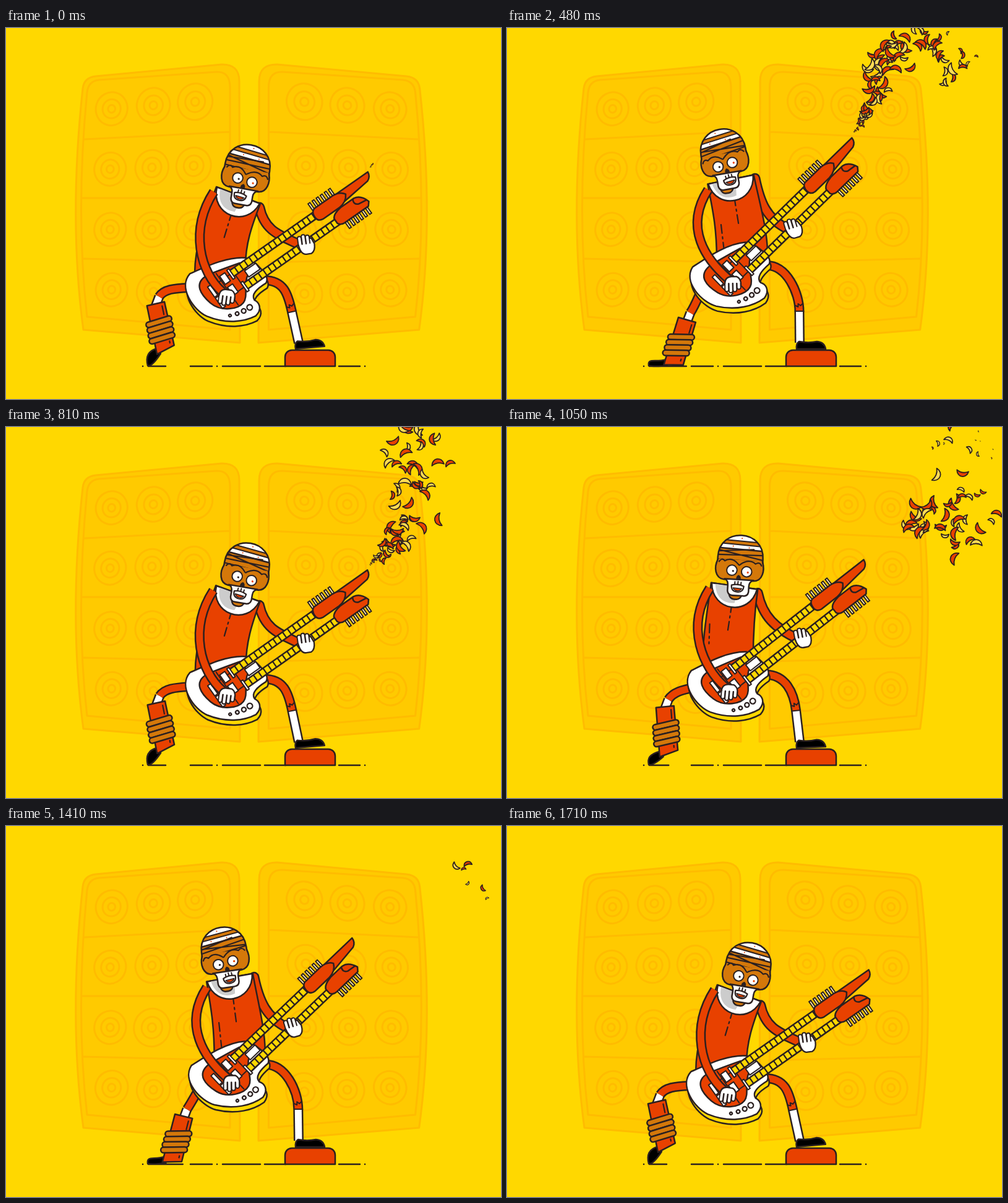
An HTML page with a canvas for the animation above (1.74 s loop, 800 px wide and 600 px high).

```html
<!DOCTYPE html>
<html lang="en">
<head>
<meta charset="utf-8">
<title>Guitarist</title>
<style>
html, body { margin: 0; width: 100%; height: 100%; overflow: hidden; background: #ffd800; }
canvas { display: block; }
</style>
</head>
<body>
<canvas id="stage" width="800" height="600"></canvas>
<script>
const ctx = document.getElementById('stage').getContext('2d');
const LOOP = 1740, BEAT = 870, PEAK = 450, STEP = 30;
const INK = '#2b2020', RED = '#e84100', ORANGE = '#d4780a', YELLOW = '#ffd800', WHITE = '#fff';
const CAB = '#ffca00', CAB_LINE = '#ffbc00';
const rad = d => d * Math.PI / 180;
const mix = (a, b, p) => a + (b - a) * p;
const add = ([x, y], dx, dy) => [x + dx, y + dy];

function noise(i, salt) {
  const v = Math.sin(i * 127.1 + salt * 311.7) * 43758.5453;
  return v - Math.floor(v);
}

// Rise of the body: 0 is the crouch, 1 the upright pose.
function rise(t) {
  t = (t % BEAT + BEAT) % BEAT;
  const x = t < PEAK ? t / PEAK : (BEAT - t) / (BEAT - PEAK);
  return x ** 3 * (x * (x * 6 - 15) + 10);
}

// Joints as [x, y, angle]: crouched, upright, and the bow of the path between.
const JOINTS = {
  guitar: [[377, 405, -35], [380, 381, -44.3]],
  chest: [[375.5, 270.5, 21], [361.5, 245, -11.5], [-4, -6, -3]],
  head: [[386, 246, 10], [352.5, 221, -10], [0, -6, 0]],
  boot: [[257, 521, -11], [268, 545, 18], [0, 0, -2]],
  hip: [[296, 420, 0], [314, 425, 0]],
  ankle: [[462, 459, -12], [472.5, 458, 0], [2, 0, 2]]
};

// World position of a point given in a joint's own frame.
function place([x, y, angle], u, v) {
  const c = Math.cos(rad(angle)), s = Math.sin(rad(angle));
  return [x + u * c - v * s, y + u * s + v * c];
}

function poseAt(t) {
  const p = rise(t), pose = { p };
  for (const [name, [low, up, bow = [0, 0, 0]]] of Object.entries(JOINTS))
    pose[name] = low.map((v, i) => mix(v, up[i], p) + bow[i] * 4 * p * (1 - p));
  pose.strum = place(pose.guitar, -33, 12.5);
  pose.fret = place(pose.guitar, mix(121, 100, p), 16);
  return pose;
}

function paint(path, fill, width = 2.5, line = INK) {
  if (fill) { ctx.fillStyle = fill; ctx.fill(path); }
  if (width) { ctx.lineWidth = width; ctx.strokeStyle = line; ctx.stroke(path); }
}
const svg = (d, fill, width, line) => paint(new Path2D(d), fill, width, line);
const seg = (x, y, x2, y2, width, line) => svg(`M${x},${y}L${x2},${y2}`, null, width, line);

function oval(x, y, rx, ry, fill, width, line, tilt = 0) {
  const path = new Path2D();
  path.ellipse(x, y, rx, ry, tilt, 0, 7);
  paint(path, fill, width, line);
}

function box(x, y, w, h, r, fill, width) {
  const path = new Path2D();
  path.roundRect(x, y, w, h, r);
  paint(path, fill, width);
}

// Outlined tube: a line through two points or a cubic through four.
function limb(pts, width, color, cap = 'butt') {
  const path = new Path2D(`M${pts[0]}${pts[3] ? 'C' : 'L'}${pts.slice(1)}`);
  ctx.lineCap = cap;
  paint(path, null, width + 5);
  paint(path, null, width, color);
  ctx.lineCap = 'round';
}

function local([x, y, angle = 0], draw) {
  ctx.save();
  ctx.translate(x, y);
  ctx.rotate(rad(angle));
  draw();
  ctx.restore();
}

function dashes(x, y, x2, y2) {
  ctx.setLineDash([14, 6, 3, 6]);
  seg(x, y, x2, y2, 2.2);
  ctx.setLineDash([]);
}

function cabinet(t, side) {
  svg('M125,488Q101,310 124,98Q126,80 145,78L348,59Q377,58 377,86L378,509Z', CAB, 3, CAB_LINE);
  svg('M131,467Q112,300 131,104Q133,86 150,84L340,71Q362,70 362,96V488Z' +
    'M127,180L361,168M122,275H362M125,373L363,379', null, 3, CAB_LINE);
  for (let i = 0; i < 12; i++) {
    const col = i % 3, row = Math.floor(i / 3);
    const x = 168 + 67.5 * col + 1.2 * (row - 1.5) ** 2;
    const y = 125 + 100.5 * row + 3 * (row - 1.9) * (col - 1);
    const beat = 150 + 1400 * noise(i, side);
    const r = (25.5 + 1.2 * col) * (1 + 0.12 * Math.max(0, 1 - Math.abs(t - beat) / 90));
    for (const f of [1, 0.57, 0.23]) oval(x, y, r * f, r * f * 1.06, null, 3, CAB_LINE, 0.3);
  }
}

function speakers(t) {
  cabinet(t, 1);
  ctx.save();
  ctx.transform(-1.026, 0, 0, 1, 795.9, 0);
  cabinet(t, 2);
  ctx.restore();
}

function ground({ p }) {
  svg(`M221,547h.1M230,547H${mix(258, 290, p * p)}M298,547H333M341,547h.1` +
    'M350,547H411M418,547H452M538,547H572M580,547h.1');
  box(451, 521, 81, 26, [11, 11, 0, 0], RED);
}

function rightLeg({ p, guitar, ankle }) {
  limb([ankle.slice(0, 2), [473, 509]], 11, WHITE);
  const hip = add(guitar, 40, 3);
  limb([hip, add(hip, 32, 0), place(ankle, 0, -30), ankle.slice(0, 2)], 11, RED);
  local(ankle, () => svg('M-7,0H7M-6,-9L-2,-7L-2,-12L2,-9L5,-12', null, 2));
  local([467, 519, -5 * (1 - p) ** 2], () =>
    svg('M1,0Q0,-9 5,-12Q20,-9 34,-12Q46,-11 48,0Z', '#000'));
}

function leftLeg({ p, hip, boot }) {
  const top = place(boot, 0, -76), cuff = add(top, 5, -12);
  limb([cuff, add(top, -1, 4)], 11, WHITE);
  limb([hip.slice(0, 2), add(hip, mix(-24, -4, p), mix(1, 8, p)), add(cuff, 8, -12), cuff], 11, RED);
  const heel = place(boot, -13, -5), sole = place(boot, -8, 4);
  svg(`M${heel}C${add(heel, -18, 5)} 227,${mix(538, 533, p)} 229,546Q236,548 ${sole}Z`, '#000');
  local(boot, () => {
    svg('M-15,-76L14,-77L16,-5L-14,4Z', RED);
    dashes(9, -71, 10, -10);
    for (let i = 0; i < 4; i++)
      local([-1, -47 + i * 9, mix(-6, -17, p)], () => limb([[-17, 0], [17, 0]], 6.5, ORANGE, 'round'));
  });
}

function torso({ p, guitar, chest, fret }) {
  const left = place(chest, -38, 0), right = place(chest, 38, 0);
  // fretting arm sits behind the body
  const shoulder = place(chest, 39, 6);
  limb([shoulder, add(shoulder, 8, 38), add(fret, -44, -14), add(fret, -8, 3)], 12, RED, 'round');
  const waist = add(guitar, mix(-31, 0, p), -14);
  const hemL = add(waist, -41, 6), hemR = add(waist, 41, -6);
  svg(`M${left}L${right}C${place(chest, 38, 40)} ${add(hemR, 0, -35)} ${hemR}` +
    `L${hemL}C${add(hemL, 0, -45)} ${place(chest, -38, 50)} ${left}Z`, RED);
  const mid = place(chest, 0, 29), flank = add(hemL, mix(14, 7, p), mix(-78, -55, p));
  dashes(...mid, ...add(mid, mix(-13, 7, p), 43));
  dashes(...flank, ...add(flank, mix(-4, 5, p), mix(27, 42, p)));
  local(chest, () => {
    svg('M-37,0C-31,46 31,46 37,0Z', WHITE);
    svg('M-31,1C-27,24 -12,31 4,27L6,14L-6,1Z', '#ccc', 0);
  });
}

function head({ p, head }) {
  const lean = mix(7, -7, p);
  local(head, () => {
    box(-14, 34, 20, 12, [0, 0, 8, 8], ORANGE);
    const dome = new Path2D('M-36,-8V-21C-36,-70 37,-70 37,-21V-8Z');
    ctx.save();
    ctx.clip(dome);
    paint(dome, ORANGE, 0);
    ctx.rotate(rad(lean));
    svg('M-50,-75H50V-36L-50,-34Z', WHITE);
    svg('M-50,-48L50,-49V-43L-50,-42Z', ORANGE, 2);
    svg('M-50,-33L50,-19M-50,-22L50,-30M-50,-27L20,-37M-50,-15L50,-19', null, 2.2);
    for (let i = 0; i < 4; i++) oval(i * 13 - 14, i % 2 ? -53 : -39, 1, 1, RED, 0);
    ctx.restore();
    paint(dome);
    svg('M-34,-18C-41,-4 -39,14 -24,15H24C39,14 41,-4 35,-18', ORANGE, 0);
    svg('M-36,-16C-41,-4 -39,14 -24,15H24C39,14 41,-4 37,-16');
    svg('M-23,14Q-17,16 -17,24V33Q-16,40 -9,40H9Q16,40 17,33V24Q17,16 24,14Z', WHITE);
    ctx.rotate(rad(lean));
    svg('M-34,-12Q-30,-19 -25,-14Q-14,-22 -3,-11Q-1,-8 1,-11Q14,-22 25,-14Q31,-19 35,-12', null, 2.2);
    for (const x of [-12, 12]) {
      oval(x, 0, 8.3, 8.3, WHITE, 2);
      oval(x + 2, 1, 1.6, 1.6, x < 0 ? INK : RED, 0);
    }
    svg('M0,7Q4,9 3,14H-3Q-4,9 0,7Z', INK, 1);
    svg('M-5,18V24M0,17V24M5,18V24', null, 2);
    svg('M-10,24Q0,20 10,24Q10,34 0,34Q-10,34 -10,24Z', WHITE, 2.2);
    svg('M-7,28H7Q5,32 0,32Q-5,32 -7,28Z', RED, 1.5);
  });
}

const body = new Path2D('M28,-21C5,-40 -30,-46 -61,-52C-90,-45 -90,0 -78,20C-60,48 -35,62 -13,65' +
  'C3,62 4,50 0,43C0,32 14,30 31,31C42,26 38,10 36,-4Z');
const guard = new Path2D('M15,-20C-10,-27 -25,-31 -40,-34C-66,-36 -66,-14 -61,6' +
  'C-55,28 -30,40 -17,36C-4,32 0,10 17,2Z');

function neck(v, from, to) {
  limb([[from, v], [to, v]], 9, YELLOW);
  for (let u = from + 9; u < to - 3; u += 9.5) seg(u, v - 5, u, v + 5, 2.3);
  box(from - 4, v - 9, 4, 18, 0, WHITE, 2);
}

function pegs(u, v, dir) {
  ctx.lineCap = 'butt';
  for (let x = u; x < u + 48; x += 8) {
    seg(x, v, x, v + dir * 14, 5.5);
    seg(x, v, x, v + dir * 12, 1.6, '#fff3c0');
  }
  ctx.lineCap = 'round';
}

function guitar({ guitar: g }) {
  local([g[0] + 2, g[1] + 8, g[2]], () => paint(body, YELLOW));
  local(g, () => {
    paint(body, WHITE);
    paint(guard, RED);
    svg('M-40,-14H10M-40,16H10M-26,-28V34M-2,-20V20', null, 2);
    for (const v of [-18, 4]) {
      box(-50, v, 6, 20, 0, WHITE, 2);
      box(-24, v - 3, 10, 16, 0, WHITE, 2);
    }
    box(14, -5, 22, 12, 0, WHITE, 2);
    for (let i = 0; i < 4; i++) {
      const r = 2 + 0.8 * i;
      oval(11.2 * i - 46.7, 48 - 7.5 * (1 - i / 3) ** 2, r, r, WHITE, 2.3);
    }
    neck(-13.5, -5, 160);
    neck(16, 2, 184);
    pegs(162, -22, -1);
    pegs(194, 23, 1);
    svg('M198,-22L269,-22Q268,-13 260,-10L216,-5L196,-3Z', RED);
    svg('M164,-23H200Q214,-22 219,-13Q213,-2 198,-1H166Q157,-2 157,-11Q157,-21 164,-23Z', RED);
    svg('M181,9V18Q184,24 191,24H238L243,18Q238,2 226,0H200Q184,2 181,9ZM224,0Q219,8 227,12L241,14', RED);
  });
}

function fingers(count, dir) {
  for (let i = 0; i < count; i++) {
    const x = -10 + i * 6.5, tip = dir * (8 + 4 * Math.sin(i + 0.5));
    svg(`M${x - 3},0V${tip}a3,3 0 0 ${dir > 0 ? 0 : 1} 6,0V0`, WHITE, 2);
  }
}

function hands({ chest, guitar, strum, fret }) {
  const shoulder = place(chest, -39, 9);
  limb([shoulder, add(shoulder, -40, 62), add(strum, -43, -38), add(strum, -7, -7)], 11, RED);
  local([...strum, guitar[2] + 43], () => {
    svg('M-13,-1Q-12,-11 -2,-11H6Q13,-8 13,2L8,8H-9Z', WHITE, 2.3);
    fingers(4, 1);
  });
  local([...fret, guitar[2] + 27], () => {
    svg('M-13,0Q-11,17 -2,17H6Q13,14 13,2L9,-8H-8Z', WHITE, 2.3);
    fingers(3, -1);
  });
}

// Chips leave the tip of the upper neck and keep part of its swing.
const CHIPS = 145, SPRAY = 850, REACH = 270, FADE = 130;
const tipAt = t => place(poseAt(t).guitar, 277, -26);
const chips = Array.from({ length: CHIPS }, (_, i) => {
  const late = i / CHIPS, born = late * SPRAY - 12;
  const [x, y] = tipAt(born), [x2, y2] = tipAt(born + 1);
  const way = rad(-52 + (noise(i, 1) + noise(i, 2) - 1) * mix(9, 30, late));
  const speed = mix(0.37, 0.56, noise(i, 3));
  return {
    born, x, y, life: REACH / speed,
    vx: Math.cos(way) * speed + x2 - x, vy: Math.sin(way) * speed + y2 - y,
    size: mix(6, 11, noise(i, 5)), turn: noise(i, 6) * 360, spin: noise(i, 7) - 0.5,
    fill: noise(i, 8) < 0.58 ? RED : '#ffdc55'
  };
});

function spray(t) {
  for (const c of chips) {
    const age = t - c.born;
    if (age < 0 || age > c.life) continue;
    const s = c.size * Math.min(1, 0.1 + age / FADE, (c.life - age) / FADE);
    local([c.x + c.vx * age, c.y + c.vy * age, c.turn + c.spin * age * 0.5], () =>
      svg(`M${-s},${-s * 0.4}C${-s * 0.8},${s * 0.9} ${s * 0.8},${s * 0.9} ${s},${-s * 0.4}` +
        `Q0,${s * 0.2} ${-s},${-s * 0.4}Z`, c.fill, Math.min(1.8, 0.5 + s * 0.2)));
  }
}

function draw(t) {
  const pose = poseAt(t);
  ctx.fillStyle = YELLOW;
  ctx.fillRect(0, 0, 800, 600);
  speakers(t);
  for (const part of [ground, leftLeg, rightLeg, torso, head, guitar, hands]) part(pose);
  spray(t);
}

ctx.lineCap = ctx.lineJoin = 'round';
const start = performance.now();
function tick() {
  const t = (performance.now() - start) % LOOP;
  draw(Math.floor(t / STEP) * STEP);
  requestAnimationFrame(tick);
}
tick();
</script>
</body>
</html>
```
